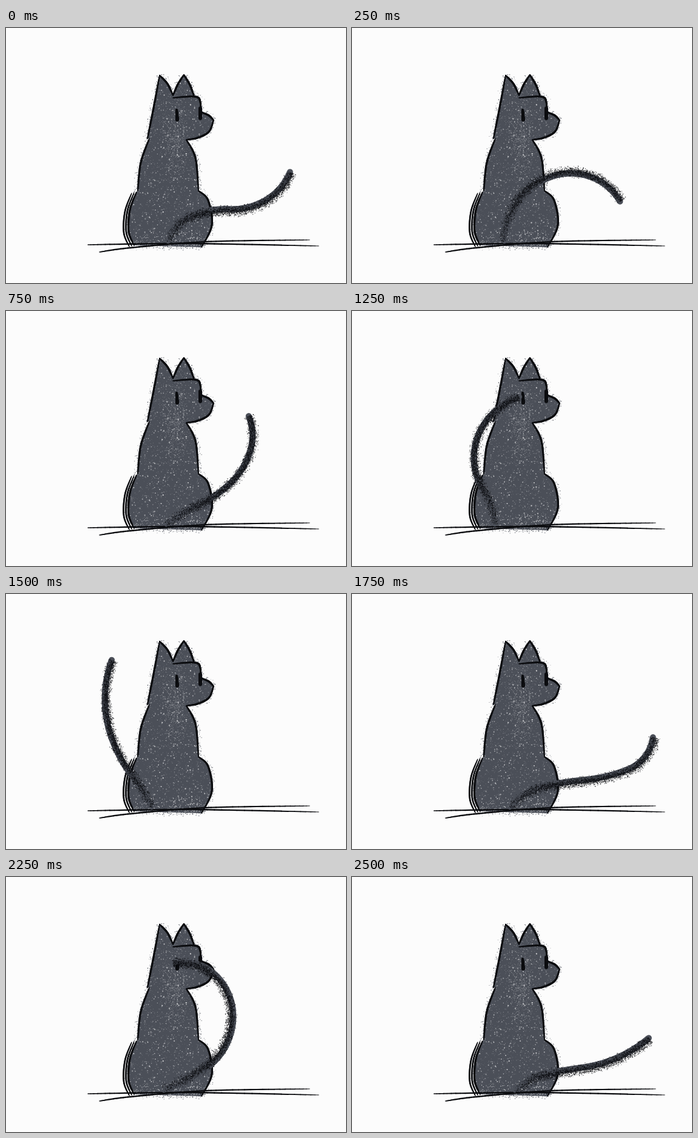
An HTML page with a canvas that plays this animation: 560 by 420 pixels, repeating every 2.62 s.

```html
<!DOCTYPE html>
<html lang="en">
<head>
<meta charset="utf-8">
<title>Cat swishing its tail</title>
<style>
html, body { margin: 0; width: 100%; height: 100%; overflow: hidden; background: #fcfcfc; }
canvas { display: block; }
</style>
</head>
<body>
<canvas id="stage" width="560" height="420"></canvas>
<script>
const PAPER = '#fcfcfc', FUR = '#4b4f58', INK = '#0c0d10', LOOP = 2620, POSES = 21;
const view = document.getElementById('stage').getContext('2d');
const still = document.createElement('canvas');
still.width = 560;
still.height = 420;

let seed = 1;
function rnd() {
  seed = (seed + 0x6d2b79f5) | 0;
  let t = Math.imul(seed ^ (seed >>> 15), 1 | seed);
  t = (t + Math.imul(t ^ (t >>> 7), 61 | t)) ^ t;
  return ((t ^ (t >>> 14)) >>> 0) / 4294967296;
}
const bell = () => (rnd() + rnd() + rnd() - 1.5) * 2;
const mix = (a, b, u) => a + (b - a) * u;

// Catmull-Rom samples through a flat list of x, y pairs
function spline(flat, steps = 20) {
  const p = [], out = [];
  for (let i = 0; i < flat.length; i += 2) p.push([flat[i], flat[i + 1]]);
  const at = i => p[Math.max(0, Math.min(p.length - 1, i))];
  for (let i = 0; i < p.length - 1; i++) {
    const [a, b, c, d] = [at(i - 1), at(i), at(i + 1), at(i + 2)];
    for (let s = 0; s < steps; s++) {
      const u = s / steps;
      out.push([0, 1].map(k => b[k] + 0.5 * u * (c[k] - a[k] +
        u * (2 * a[k] - 5 * b[k] + 4 * c[k] - d[k] +
        u * (3 * (b[k] - c[k]) + d[k] - a[k])))));
    }
  }
  out.push(p[p.length - 1]);
  return out;
}

function brush(g, pts, width, color) {
  g.strokeStyle = color;
  g.lineCap = 'round';
  for (let i = 1; i < pts.length; i++) {
    g.lineWidth = width(i / (pts.length - 1));
    g.beginPath();
    g.moveTo(...pts[i - 1]);
    g.lineTo(...pts[i]);
    g.stroke();
  }
}

const inkLine = (g, pts, w = 3.2) =>
  brush(g, pts, u => w * (0.4 + 0.6 * Math.sqrt(Math.sin(Math.PI * u))), INK);

function speck(g, x, y, size, alpha) {
  g.globalAlpha = alpha;
  g.fillRect(x - size / 2, y - size / 2, size, size);
}

// Scatters grain along a path, shifted sideways
function grain(g, pts, density, spread, shift = 0) {
  for (let i = 1; i < pts.length; i++) {
    const [x, y] = pts[i - 1], dx = pts[i][0] - x, dy = pts[i][1] - y;
    const len = Math.hypot(dx, dy) || 1;
    for (let n = Math.floor(len * density(i / pts.length) + rnd()); n > 0; n--) {
      const u = rnd(), off = shift + bell() * spread;
      speck(g, x + dx * u - dy / len * off, y + dy * u + dx / len * off,
        0.6 + rnd() * 0.8, 0.4 + rnd() * 0.6);
    }
  }
  g.globalAlpha = 1;
}

// Joined in order, these curves form the silhouette; each is also an ink line
const HAUNCH = [211, 358, 202, 335, 204, 300, 215, 270];
const CURVES = [
  [233, 182, 243, 132, 253, 78],                      // rear ear
  [253, 78, 266, 92, 275, 111],
  [275, 111, 283, 93, 293, 77],                       // front ear
  [293, 77, 303, 94, 310, 113],
  [275, 115, 311, 113, 320, 122, 320, 150],           // brow
  [322, 139, 334, 144, 342, 152],                     // muzzle
  [342, 152, 334, 171, 315, 181, 297, 184],           // jaw
  [297, 184, 312, 214, 317, 268],                     // chest
  [317, 268, 333, 284, 339, 325, 322, 361],           // thigh
  HAUNCH,
  [217, 268, 222, 222, 236, 182]                      // back
];

function drawCat() {
  const g = still.getContext('2d'), lines = CURVES.map(c => spline(c));
  const edge = lines.flat(), body = new Path2D();
  edge.forEach(p => body.lineTo(...p));
  edge.push(edge[0]);
  seed = 77;
  g.fillStyle = PAPER;
  g.fillRect(0, 0, 560, 420);
  g.fillStyle = FUR;
  g.fill(body);
  grain(g, edge, () => 1.8, 3);

  g.save();
  g.clip(body);
  g.fillStyle = PAPER;
  for (let i = 0; i < 2600; i++) {
    speck(g, 202 + rnd() * 142, 82 + rnd() * 277, 0.5 + rnd() ** 4 * 1.5, 0.15 + rnd() * 0.6);
  }
  // paler streak down the neck, worn patch at the floor
  for (let i = 0; i < 700; i++) speck(g, 278 + bell() * 10, 185 + bell() * 40, 0.9, rnd() * 0.6);
  for (let i = 0; i < 260; i++) speck(g, 210 + rnd() * 126, 358 - rnd() ** 2 * 24, 1.1, rnd());
  g.restore();

  lines.forEach(l => inkLine(g, l));
  for (const n of [1, 2]) {
    inkLine(g, spline(HAUNCH).map(([x, y]) => [x - 4 * n, y + n]), 2.6);
  }
  inkLine(g, spline([135, 357, 300, 355, 515, 359]), 2.5);
  inkLine(g, spline([154, 369, 205, 362, 330, 352, 500, 349]), 2.5);
  brush(g, spline([281, 135, 282, 151]), u => 4 + 2 * u, INK);
  brush(g, spline([320, 132, 320, 149]), () => 5.5, INK);
}

// Key tails: step, root x, length, then headings from root to tip (degrees right of up)
const KEYS = [
  [0, 267, 250, 10, 72, 92, 60, 22],
  [2, 251, 270, 5, 33, 68, 108, 150],
  [6, 264, 248, 50, 66, 47, 19, -22],
  [10, 235, 250, -5, -32, 5, 40, 70],
  [12, 240, 264, -30, -35, -20, 0, 20],
  [14, 260, 280, 35, 80, 84, 68, 8],
  [16, 245, 240, -20, -25, -5, 10, 20],
  [18, 260, 332, 72, 52, 8, -42, -100],
  [20, 268, 242, 42, 80, 82, 66, 50]
];

function tailAt(step) {
  const j = KEYS.findIndex(k => k[0] >= step), next = KEYS[j], prev = KEYS[Math.max(0, j - 1)];
  const u = (step - prev[0]) / (next[0] - prev[0] || 1);
  const [, root, length, ...turn] = prev.map((v, i) => mix(v, next[i], u));
  const pts = [[root, 352]], n = 100;
  for (let i = 0; i < n; i++) {
    const s = (i + 0.5) / n * (turn.length - 1), a = Math.floor(s);
    const angle = mix(turn[a], turn[a + 1], s - a) * Math.PI / 180, [x, y] = pts[i];
    pts.push([x + Math.sin(angle) * length / n, y - Math.cos(angle) * length / n]);
  }
  return { pts, curl: (turn[turn.length - 1] - turn[0]) * Math.PI / 180 };
}

function drawTail(step) {
  const { pts, curl } = tailAt(step);
  const thick = u => Math.min(1, u * 3);
  seed = 900 + step * 31;
  view.drawImage(still, 0, 0);
  brush(view, pts, u => 6 + 4 * thick(u), FUR);
  view.fillStyle = INK;
  // a curled tail shows its other, shaded edge
  grain(view, pts, u => 4 + 10 * thick(u), 3.8, 3.5 * Math.cos(curl));
}

let shown = -1;
function tick() {
  const t = performance.now() % LOOP;
  // holds alternate between 120 and 130 ms
  const step = Math.min(POSES - 1, Math.floor((Math.floor(t / 10) + 0.5) / 12.5));
  if (step !== shown) drawTail(shown = step);
  requestAnimationFrame(tick);
}

drawCat();
tick();
</script>
</body>
</html>
```
